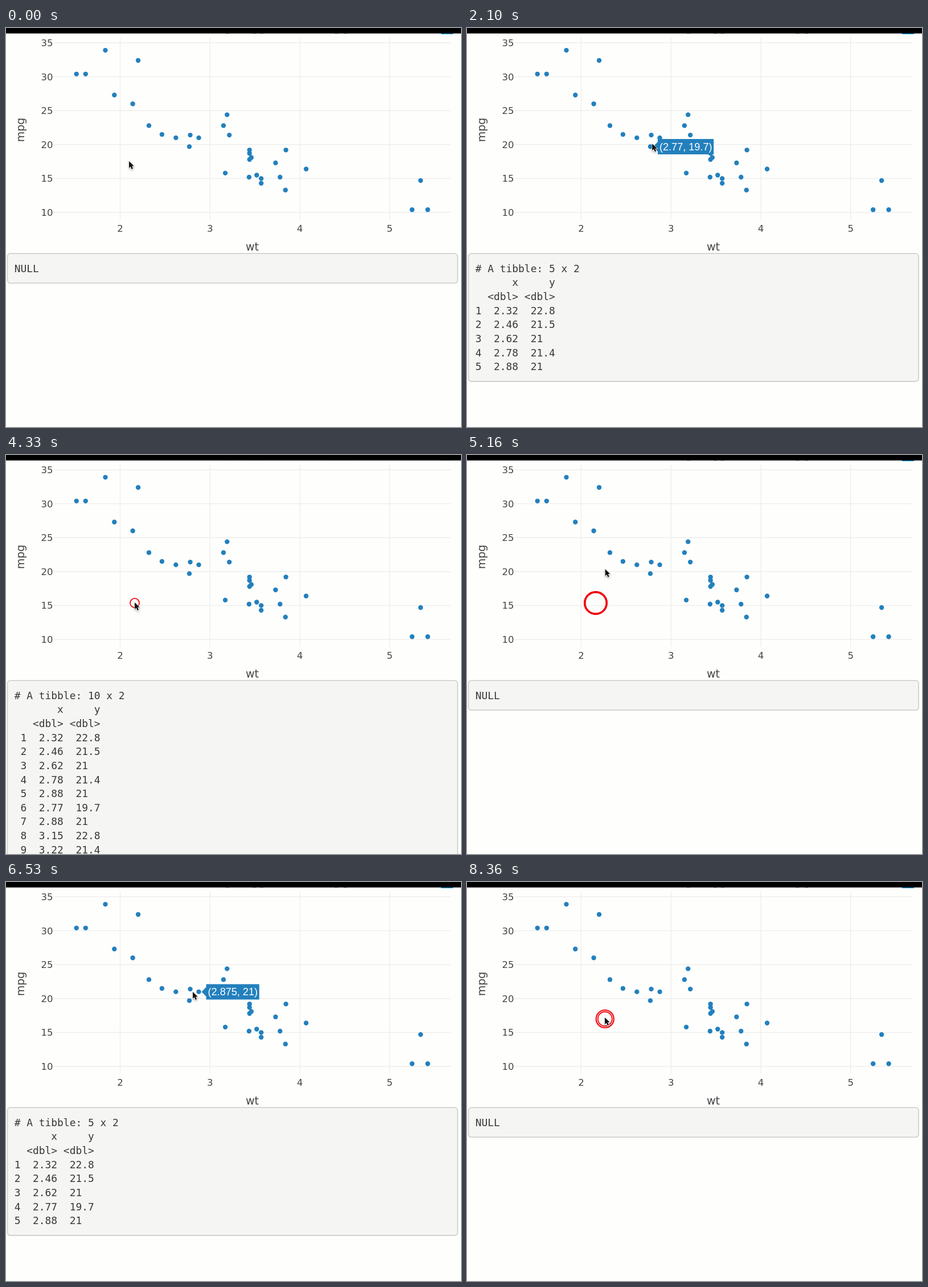
An HTML page with a canvas that plays this animation: 799x701 px, repeating every 8.4 s.

```html
<!DOCTYPE html>
<html lang="en">
<head>
<meta charset="utf-8">
<title>Scatter plot hover log</title>
<style>
html, body { margin: 0; width: 799px; height: 701px; overflow: hidden; background: #fefefd; }
canvas { display: block; }
</style>
</head>
<body>
<canvas width="799" height="701"></canvas>
<script>
const ctx = document.querySelector('canvas').getContext('2d');
const LOOP = 8400, BLUE = '#2380bd', PAPER = '#fefefd';
const PLOT_FONT = '"DejaVu Sans", sans-serif';

const px = w => 200.5 + (w - 2) * 157.73;
const py = m => 26 + (35 - m) * 11.92;
const clamp = v => Math.max(0, Math.min(1, v));

// mtcars: weight, miles per gallon; the hovered ones come first
const cars = [
  [2.32, 22.8], [2.465, 21.5], [2.62, 21], [2.78, 21.4], [2.875, 21], [2.77, 19.7],
  [3.15, 22.8], [3.215, 21.4], [3.17, 15.8],
  [3.44, 18.7], [3.46, 18.1], [3.57, 14.3], [3.19, 24.4], [3.44, 19.2], [3.44, 17.8],
  [4.07, 16.4], [3.73, 17.3], [3.78, 15.2], [5.25, 10.4], [5.424, 10.4], [5.345, 14.7],
  [2.2, 32.4], [1.615, 30.4], [1.835, 33.9], [3.52, 15.5], [3.435, 15.2], [3.84, 13.3],
  [3.845, 19.2], [1.935, 27.3], [2.14, 26], [1.513, 30.4], [3.57, 15]
].map(([w, m]) => ({ w, m, x: px(w), y: py(m) }));

// Bursts of pointer movement: start, end, then cars (by index) or places to reach
const bursts = [
  [430, 760, 0],
  [900, 1700, 1, 2, 3, 4],
  [1760, 2600, 5, 4, 6],
  [2630, 3250, 7, 8],
  [3250, 3330, [373, 246]],
  [3760, 4160, [226, 259]],
  [4970, 5460, 0, 1],
  [5500, 6330, 2, 5, 4],
  [6430, 6530, [328, 193]],
  [6530, 7260, 3, 5],
  [7500, 7960, [242, 238]]
];
const doubleClicks = [[4225, 226, 260], [8042, 242.3, 240.5]];
const CLICK_GAP = 115, CLEAR_DELAY = 260, HOVER_LEAD = 100, HOVER_RANGE = 28, STOP_SHORT = 6;

// Arrivals are evenly spread over a burst; the pointer halts just short of a car
const legs = [];
let place = [216, 234];
for (const [from, to, ...goals] of bursts) {
  const lead = goals.length > 1 ? HOVER_LEAD : 0;
  let start = from;
  goals.forEach((goal, k) => {
    const end = from + lead + (to - from - lead) * (k + 1) / goals.length;
    const car = cars[goal];
    let target = goal;
    if (car) {
      const dx = place[0] - car.x, dy = place[1] - car.y, d = STOP_SHORT / Math.hypot(dx, dy);
      target = [car.x + dx * d, car.y + dy * d];
    }
    legs.push({ start, end, from: place, to: target, car });
    place = target;
    start = end;
  });
}

function pointerAt(t) {
  const leg = legs.findLast(l => l.start <= t);
  if (!leg) return legs[0].from;
  const u = clamp((t - leg.start) / (leg.end - leg.start)), e = u * u * (3 - 2 * u);
  return leg.from.map((v, i) => v + (leg.to[i] - v) * e);
}

function text(s, x, y, font, color, align = 'left') {
  ctx.font = font;
  ctx.fillStyle = color;
  ctx.textAlign = align;
  ctx.fillText(s, x, y);
}

function rect(x, y, w, h, color) {
  ctx.fillStyle = color;
  ctx.fillRect(x, y, w, h);
}

function circle(x, y, r) {
  ctx.beginPath();
  ctx.arc(x, y, r, 0, 2 * Math.PI);
}

function drawPlot() {
  const tick = '16.5px ' + PLOT_FONT, title = '19px ' + PLOT_FONT;
  for (let m = 10; m <= 35; m += 5) {
    rect(84, py(m) - .7, 697, 1.4, '#eee');
    text(m, 82.5, py(m) + 6, tick, '#444', 'right');
  }
  for (let w = 2; w <= 5; w++) {
    rect(px(w) - .7, 17, 1.4, 320, '#eee');
    text(w, px(w), 358.3, tick, '#444', 'center');
  }
  text('wt', 432.5, 391, title, '#444', 'center');
  ctx.save();
  ctx.translate(32, 179);
  ctx.rotate(-Math.PI / 2);
  text('mpg', 0, 0, title, '#444', 'center');
  ctx.restore();
  ctx.fillStyle = BLUE;
  for (const { x, y } of cars) {
    circle(x, y, 4.2);
    ctx.fill();
  }
}

// The toolbar's lower edge blinks out around each double click
function drawTopBar(t) {
  ctx.globalAlpha = Math.min(...doubleClicks.map(([at]) => clamp((Math.abs(t - at - 100) + 20) / 200)));
  rect(764, 9, 21, 2, '#1a9bd7');
  for (const x of [386, 433, 446, 577, 593]) rect(x, 9, 6, 1.6, '#bbb');
  ctx.globalAlpha = 1;
  rect(0, 0, 799, 9.6, '#000');
}

// two decimals, halves to even
function hundredths(v) {
  const n = v * 100, half = Math.abs(n % 1 - .5) < 1e-6;
  return ((half ? 2 * Math.round(n / 2) : Math.round(n)) / 100).toFixed(2);
}

function logLines(t) {
  const cleared = Math.max(0, ...doubleClicks.map(c => c[0] + CLEAR_DELAY).filter(at => at <= t));
  const rows = legs.filter(l => l.car && l.end > cleared && l.end <= t);
  if (!rows.length) return ['NULL'];
  const wide = String(rows.length).length, pad = ' '.repeat(wide);
  return [
    `# A tibble: ${rows.length} x 2`,
    pad + '     x     y',
    pad + ' <dbl> <dbl>',
    ...rows.map(({ car }, k) => `${String(k + 1).padStart(wide)}  ${hundredths(car.w)}  ${car.m}`)
  ];
}

function drawLog(t) {
  const lines = logLines(t), step = 24.65;
  ctx.beginPath();
  ctx.roundRect(2.5, 396.3, 790.5, 52 + (lines.length - 1) * step, 5);
  ctx.fillStyle = '#f5f5f4';
  ctx.fill();
  ctx.strokeStyle = '#ccc';
  ctx.lineWidth = 1.6;
  ctx.stroke();
  lines.forEach((s, i) =>
    text(s, 14.7, 428.6 + i * step, '17.9px "DejaVu Sans Mono", monospace', '#383838'));
}

function drawTooltip(t) {
  const leg = legs.findLast(l => l.car && l.end - HOVER_LEAD <= t);
  if (!leg) return;
  const { w, m, x, y } = leg.car, [mx, my] = pointerAt(t);
  if (Math.hypot(mx - x, my - y) > HOVER_RANGE) return;
  const font = '18.1px "Liberation Sans", Arial, sans-serif', label = `(${w}, ${m})`;
  ctx.font = font;
  const left = x + 13, width = ctx.measureText(label).width + 5.7;
  ctx.fillStyle = BLUE;
  ctx.beginPath();
  ctx.rect(left, y - 13.5, width, 27);
  ctx.moveTo(left, y - 8.3);
  ctx.lineTo(x + 5, y);
  ctx.lineTo(left, y + 8.3);
  ctx.fill('evenodd');
  text(label, left + 3, y + 6.3, font, '#fff');
}

function drawRipples(t) {
  ctx.strokeStyle = '#f2060e';
  for (const [at, x, y] of doubleClicks) {
    for (const age of [t - at, t - at - CLICK_GAP]) {
      if (age < 0 || age > 1000) continue;
      const grown = 1 - Math.exp(-age / 200);
      ctx.lineWidth = 1.7 + 1.8 * grown ** 6;
      circle(x, y, 19.5 * grown);
      ctx.stroke();
    }
  }
}

function drawPointer(t) {
  const arrow = new Path2D('M0 0V12.5L2.9 9.9L5 14.8L7.4 13.8L5.3 9H9.2Z');
  ctx.save();
  ctx.translate(...pointerAt(t));
  ctx.scale(.95, .95);
  ctx.lineWidth = 1.4;
  ctx.strokeStyle = '#fff';
  ctx.shadowColor = 'rgba(0,0,0,.4)';
  ctx.shadowBlur = 3;
  ctx.shadowOffsetY = 1.5;
  ctx.stroke(arrow);
  ctx.shadowColor = 'transparent';
  ctx.fillStyle = '#111';
  ctx.fill(arrow);
  ctx.restore();
}

const begin = performance.now();
function draw(now) {
  const t = Math.max(0, now - begin) % LOOP;
  rect(0, 0, 799, 701, PAPER);
  drawPlot();
  drawTopBar(t);
  drawLog(t);
  drawTooltip(t);
  drawRipples(t);
  drawPointer(t);
  requestAnimationFrame(draw);
}
draw(begin);
</script>
</body>
</html>
```
